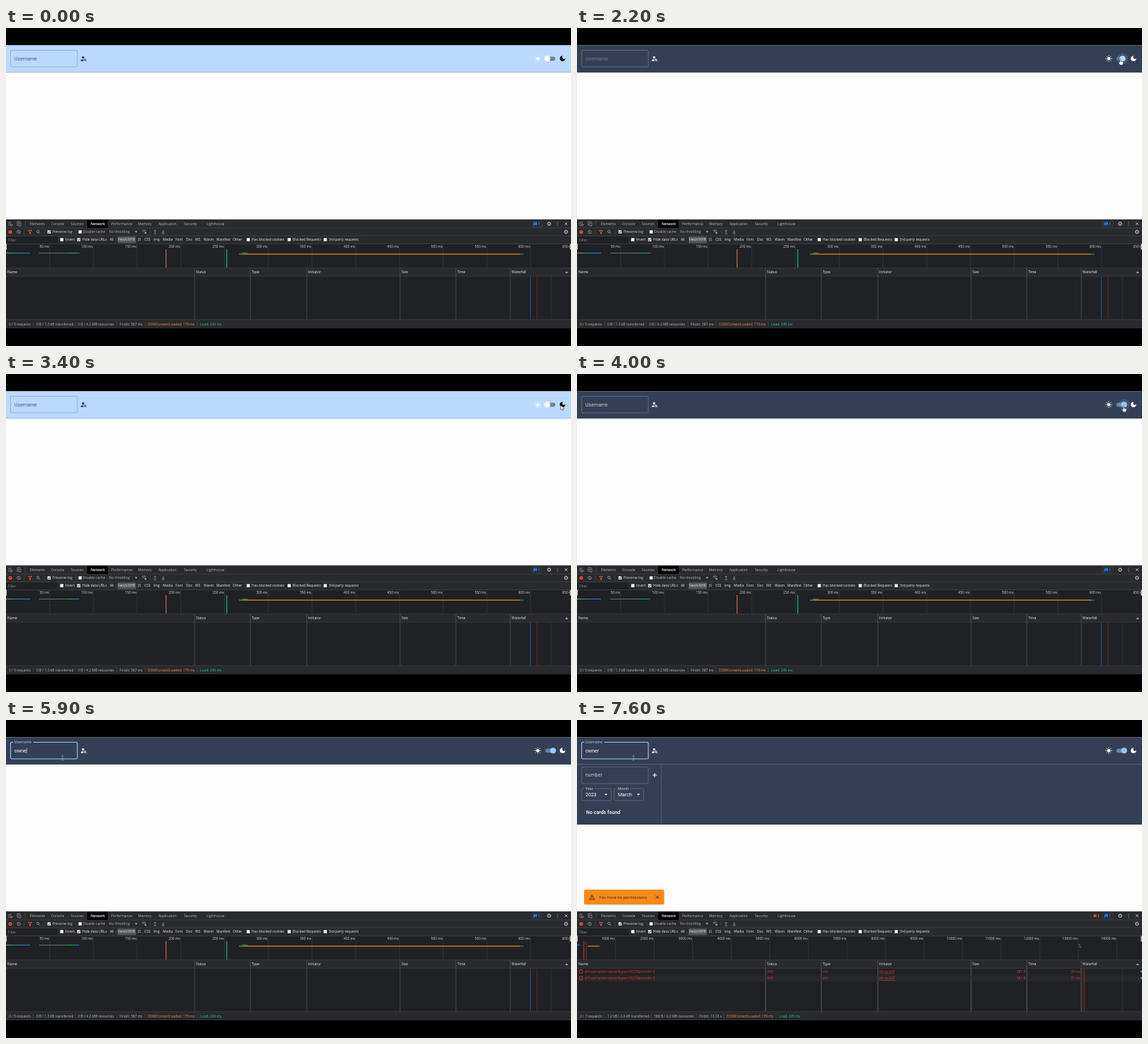
Animation, 800 px wide and 450 px high, one loop 8000 ms. Source, as an HTML page:

```html
<!DOCTYPE html>
<html>
<head>
<meta charset="utf-8">
<style>
html, body { margin: 0; height: 100%; overflow: hidden; background: #000; }
svg { display: block; width: 100vw; height: 100vh; }
text { font-family: "Open Sans", "Noto Sans", sans-serif; white-space: pre; }
.ui { font-family: Roboto, Arial, sans-serif; letter-spacing: .01em; }
</style>
</head>
<body>
<svg id="stage" viewBox="0 0 800 450">
  <g id="page"></g>
  <g id="tools"></g>
  <g id="idle"></g>
  <g id="failed"></g>
  <g id="pointer"></g>
</svg>
<script>
const $ = id => document.getElementById(id);
const rect = (x, y, w, h, fill, more = '') =>
  `<rect x="${x}" y="${y}" width="${w}" height="${h}" fill="${fill}" ${more}/>`;
const path = (d, stroke, width = .7, more = '') =>
  `<path d="${d}" fill="none" stroke="${stroke}" stroke-width="${width}" ${more}/>`;
const shape = (d, fill, more = '') => `<path d="${d}" fill="${fill}" ${more}/>`;
const dot = (x, y, r, fill, more = '') => `<circle cx="${x}" cy="${y}" r="${r}" fill="${fill}" ${more}/>`;
// y is the middle of the capitals
const text = (s, x, y, fill = '#d5d6d8', size = 4.9, more = '') =>
  `<text x="${x}" y="${y + size * .36}" fill="${fill}" font-size="${size}" ${more}>${s}</text>`;
const ui = (s, x, y, fill, size = 6.9, more = '') => text(s, x, y, fill, size, 'class="ui" ' + more);
const right = 'text-anchor="end"';
const bold = 'font-weight="600"';

/* ---------- developer tools ---------- */
const GREY = '#9aa0a6', LINE = '#46494d', ORANGE = '#ec8a4c', TEAL = '#20bfa5', RED = '#d93a3a';
const vline = (x, y1, y2, c = LINE, w = .7) => path(`M${x} ${y1}V${y2}`, c, w);
const bar = (x1, x2, y, c, w = 1.2) => path(`M${x1} ${y}H${x2}`, c, w);
const gear = (x, y) => path(`M${x - 2} ${y}a2 2 0 1 0 4 0a2 2 0 1 0 -4 0`, GREY, 1.3) +
  path(`M${x - 2.9} ${y}h5.8M${x} ${y - 2.9}v5.8`, GREY, .7) + dot(x, y, 1, '#292a2d');
const check = (x, y, on) => rect(x - 2.3, y - 2.3, 4.6, 4.6, '#f4f4f4', 'rx=".6"') +
  (on ? path(`M${x - 1.4} ${y}l1.1 1.2 1.8-2.4`, '#222', .9) : '');
const row = (items, y, fill) => items.map(([s, x]) => text(s, x, y, fill)).join('');
const columns = [['Name', 2], ['Status', 269], ['Type', 348], ['Initiator', 428], ['Size', 560], ['Time', 639], ['Waterfall', 716]];

function tools() {
  let s = rect(0, 271, 800, 154, '#202124') + rect(0, 271, 800, 34.5, '#292a2d') +
    rect(0, 340, 800, 11, '#292a2d') + rect(0, 413, 800, 12, '#292a2d');
  for (const y of [271, 283, 294, 305.5, 339.7, 351.2, 412.7]) s += bar(0, 800, y, LINE, .6);
  // tabs
  s += path('M8 275H4v4.500h1.500M6 277l3.500 1.400-1.500.7-.7 1.500z', GREY) +
    path('M16 280v-6h4.500M18 276h3v4h-3z', GREY) + vline(27, 273, 281);
  s += row([['Elements', 34], ['Console', 64], ['Sources', 92], ['Performance', 149], ['Memory', 187],
    ['Application', 216], ['Security', 252], ['Lighthouse', 284]], 277, '#b4b8bc');
  s += rect(115, 271.5, 29, 11.500, '#000') + text('Network', 120, 277, '#fff', 4.8, bold);
  s += rect(744, 273, 15, 8, 'none', `stroke="${LINE}" stroke-width=".6" rx="1"`) +
    shape('M746.500 274.800h5.500v4h-3.500l-2 1.500z', '#1a73e8') + text('1', 753.5, 277, '#9ec3fa', 4.6);
  s += gear(769, 277) + [274.8, 277, 279.2].map(y => dot(781, y, .6, GREY)).join('') +
    path('M791 275l4 4m0-4l-4 4', '#c4c7ca', .8);
  // toolbar
  s += dot(6, 288.5, 2.6, '#e5533d') + dot(6, 288.5, 1, '#8f2a20') +
    path('M15.700 288.500a2.300 2.300 0 1 0 4.600 0a2.300 2.300 0 1 0-4.600 0M16.500 286.800l3.200 3.400', GREY) +
    vline(25.500, 285, 292) + path('M31.500 286.500h5l-2 2.200v2.500h-1v-2.500z', '#e5533d', .9) +
    path('M43.500 288a1.700 1.700 0 1 0 3.400 0a1.700 1.700 0 1 0-3.400 0M46.500 289.300l2 2', GREY, .8) + vline(54, 285, 292);
  s += check(61, 288.5, 1) + text('Preserve log', 66, 288.5) + vline(99, 285, 292) + check(105, 288.5) +
    row([['Disable cache', 109], ['No throttling', 146]], 288.5, '#b4b8bc') + shape('M182.300 287.200h3.800l-1.900 2.800z', GREY);
  s += path('M192.500 287q3-2.500 6 0M193.800 288.500q1.700-1.500 3.400 0', GREY, .8) + dot(197.500, 290, 1.3, GREY) + vline(204, 285, 292) +
    path('M211 290v-4m-1.600 1.600l1.600-1.600 1.600 1.600M209 291h4', GREY) +
    path('M222.500 286v4m-1.600-1.600l1.600 1.600 1.600-1.600M220.500 291h4', GREY) + gear(793, 288.5);
  // filters
  s += rect(0, 295, 73, 10, '#202124') + text('Filter', 3, 300, '#8b8f94') + rect(158, 295.300, 26, 9, '#55585c', 'rx="1"') + vline(156, 297, 303);
  s += row([['Invert', 84], ['Hide data URLs', 108], ['All', 147], ['Fetch/XHR', 159], ['JS', 187], ['CSS', 196], ['Img', 209],
    ['Media', 222], ['Font', 240], ['Doc', 255], ['WS', 268], ['Wasm', 280], ['Manifest', 298], ['Other', 321],
    ['Has blocked cookies', 348], ['Blocked Requests', 406], ['3rd-party requests', 457]], 299.5, '#e8eaed');
  s += [79, 103, 343, 401, 452].map(x => check(x, 299.5, x == 103)).join('');
  // table
  s += row(columns, 345.7, '#e8eaed') + shape('M791.800 347h4l-2-3z', GREY);
  for (const [, x] of columns.slice(1)) s += vline(x - 2, 340, 412.5, '#54575b');
  return s + rect(0, 305.500, 1, 8, '#ccc') + rect(798.500, 305.500, 1.500, 8, '#ccc');
}

function ruler(step, unit) {
  let s = '';
  for (let i = 1; i * step < 810; i++)
    s += vline(i * step, 306, 339, '#393b3f') + text(i * unit + ' ms', i * step - 1, 309.3, '#d5d6d8', 4.8, right);
  return s;
}
function footer(items) {
  const colors = { 4: ORANGE, 5: TEAL };
  return items.map(([s, x], i) =>
    (i ? vline(x - 4, 416, 422) : '') + text(s, x, 419, colors[i] || '#b4b8bc')).join('');
}

function idle() {
  return ruler(61.9, 50) +
    bar(0, 9, 318.5, '#66806f') + bar(9, 17, 318.5, '#1c9c55') + bar(17, 34, 318.5, '#1c78c8') +
    bar(47, 88, 318.5, '#6b6d70') + bar(88, 98, 318.5, '#1c9c55') + bar(98, 104, 318.5, '#1c78c8') +
    bar(334, 342, 318.5, '#1c8c5a') + bar(330, 335, 320, '#888') + bar(335, 728, 320, '#bd7c14', 1.4) +
    bar(728, 733, 320, '#1a8888') +
    vline(226.7, 313, 339, '#df7550', 1) + vline(312.7, 313, 339, TEAL, 1) +
    vline(742.5, 352, 412, '#22508f', 1) + vline(752, 352, 412, '#702222', 1) + vline(772, 352, 412, '#393b3f') +
    footer([['0 / 5 requests', 4], ['0 B / 1.3 kB transferred', 43], ['0 B / 4.2 MB resources', 102],
      ['Finish: 587 ms', 161], ['DOMContentLoaded: 179 ms', 201], ['Load: 249 ms', 275]]);
}

function failed() {
  let s = ruler(54.6, 1000) + bar(0, 4, 318.5, '#1c78c8') + bar(15, 32, 320, '#bd7c14', 1.4) +
    vline(9.7, 313, 339, '#b8503f', .9) + vline(13.200, 313, 339, '#7d3434', .9) +
    bar(710, 712, 318, '#3c8c77') + bar(711, 714, 321, '#777') +
    rect(0, 361, 800, 9.300, '#27282b') +
    vline(715.8, 352, 412, '#5b2929') + vline(718.200, 352, 412, '#9c2b2b', .9) + vline(772, 352, 412, '#393b3f');
  for (const [, x] of columns.slice(1)) s += vline(x - 2, 351, 412.5, '#54575b');
  [356, 365.2].forEach((y, i) => {
    s += rect(3.5, y - 2.200, 4.200, 4.400, 'none', `stroke="${RED}" stroke-width=".8"`) +
      text('all?username=owner&amp;year=2023&amp;month=3', 10.5, y, RED) + text('403', 269, y, RED) + text('xhr', 348, y, RED) +
      text('xhr.js:247', 428, y, RED, 4.9, 'text-decoration="underline"') +
      text('581 B', 635.5, y, RED, 4.9, right) + text(['33 ms', '51 ms'][i], 713, y, RED, 4.9, right) +
      bar(798, 800, y, TEAL, 2);
  });
  return s + rect(731.5, 275, 4, 4, '#e5453a', 'rx=".8"') + text('2', 737, 277, '#f28b82', 4.6) +
    footer([['2 / 7 requests', 4], ['1.2 kB / 2.4 kB transferred', 43], ['188 B / 4.2 MB resources', 109],
      ['Finish: 13.10 s', 173], ['DOMContentLoaded: 179 ms', 212], ['Load: 249 ms', 286]]);
}

/* ---------- page ---------- */
const DARK = '#343f55', BLUE = '#90caf9', EDGE = '#5f6a7e';
const FLIPS = [2150, 2900, 3800], FOCUS = 4900, PANEL = 6300, REPLY = 6450;
const NAME = 'owner', KEYS = [5300, 5400, 5600, 5800, 6000];
const MOVES = [[600, 297, 230], [1400, 740, 58], [2100, 769, 43.5], [2900, 770, 44], [3400, 785.5, 44],
  [3800, 772, 43], [4150, 775, 46], [4700, 80, 53]];

const clamp = v => Math.max(0, Math.min(1, v));
const out = v => 1 - (1 - clamp(v)) ** 3;
const lerp = (a, b, p) => a + (b - a) * p;
const mix = (a, b, p) => `rgba(${a.map((v, i) => lerp(v, b[i], p))})`;
const pen = document.createElement('canvas').getContext('2d');
pen.font = '69px Roboto, Arial, sans-serif';
const width = s => pen.measureText(s).width / 10 + s.length * .069;

function mouse(t) {
  const i = MOVES.findIndex(m => m[0] > t);
  if (i < 0) return MOVES[MOVES.length - 1].slice(1);
  if (!i) return null;
  const [t0, x0, y0] = MOVES[i - 1], [t1, x1, y1] = MOVES[i];
  let p = (t - t0) / (t1 - t0);
  p = p * p * (3 - 2 * p);
  return [lerp(x0, x1, p), lerp(y0, y1, p)];
}
const box = (x, y, w, h, c, sw = .8) => rect(x, y, w, h, 'none', `stroke="${c}" stroke-width="${sw}" rx="1.600"`);
const select = (x, label, value, gap) => box(x, 97, 42, 17, EDGE) + rect(x + 4, 96, gap, 2, DARK) +
  ui(label, x + 5.500, 97, '#c6cad1', 5.200) + ui(value, x + 5.500, 105.500, '#fff') +
  shape(`M${x + 32.300} 104.600h4.400l-2.200 2.200z`, '#fff');

function panel() {
  return rect(0, 63, 800, 85, DARK) + bar(0, 800, 62.7, EDGE, .6) + vline(119.4, 63, 148, EDGE, .6) +
    box(6.500, 66.500, 94.500, 23.500, EDGE) + ui('number', 12, 78, '#bfc4cc') +
    path('M107 78h6m-3-3v6', '#fff', 1) + select(6.5, 'Year', '2023', 14) + select(52.5, 'Month', 'March', 18) +
    ui('No cards found', 13, 130.7, '#fff', 6.9, 'font-weight="500"');
}

function snackbar(p) {
  return `<g opacity="${p}" transform="translate(66.700 250.500) scale(${lerp(.8, 1, p)}) translate(-66.700 -250.500)">` +
    rect(10, 241, 113.500, 21, '#0002', 'rx="2"') + rect(10, 240, 113.500, 21, '#f58a1a', 'rx="2"') +
    path('M17.500 254l3.700-6.500 3.700 6.500zM21.200 249.500v2.200m0 .7v.8', '#2f2210', .8) +
    ui('You have no permissions', 31, 250.6, '#50320f', 6) + path('M111.500 248.500l4.400 4.400m0-4.400l-4.400 4.400', '#2f2210', .9) + '</g>';
}

function page(t, m) {
  const flips = FLIPS.filter(f => f <= t), dark = flips.length % 2;
  const age = flips.length ? t - flips[flips.length - 1] : 1e4;
  const tone = d => dark ? out(age / d) : 1 - out(age / d);
  const over = m && m[0] < 101 && m[1] < 56, focus = t >= FOCUS;
  const ink = dark ? '#fff' : '#27303b';
  let s = rect(0, 24.500, 800, 247, '#fdfdfe') + rect(0, 24.500, 800, 38.500, dark ? DARK : '#bbd9fd') +
    bar(0, 800, 62.7, dark ? '#4a5569' : '#8fa8c6', .6);
  // search field
  const shrink = out((t - FOCUS) / 200);
  s += box(6.500, 31.500, 94.500, 23.500, focus ? BLUE : over ? '#fff' : dark ? '#63748a' : '#8faacb', focus ? 1.100 : .8);
  if (focus) s += rect(10.500, 30.500, 28 * shrink, 2.200, DARK);
  s += ui('Username', 12, lerp(43.2, 31.300, shrink), focus ? BLUE : mix([0, 0, 0, .58], [255, 255, 255, .75], tone(200)), lerp(6.9, 5.200, shrink));
  const typed = NAME.slice(0, KEYS.filter(k => k <= t).length);
  s += ui(typed, 12, 43.5, '#fff');
  const last = KEYS.filter(k => k <= t).pop() || FOCUS;
  if (focus && Math.floor((t - last) / 500) % 2 == 0) s += rect(12 + width(typed), 39.500, .6, 8, '#fff');
  const icon = x => `transform="translate(${x} 38.300) scale(.417)"`;
  s += shape('M10 4a4 4 0 1 0 .01 0zM10.350 14C7.600 13.900 2 15.300 2 18v2h9.500c-2.500-2.800-1.200-5.900-1.150-6z', ink, icon(105)) +
    path('M13 16a3 3 0 1 0 6 0a3 3 0 1 0-6 0M18.200 18.200l3.100 3.100', ink, 2, icon(105));
  // theme switch
  s += dot(753, 43.300, 2.400, '#fff');
  for (let a = 0; a < 360; a += 45) s += path('M753 40.100v-1.600', '#fff', .8, `transform="rotate(${a} 753 43.300)"`);
  const p = tone(150), x = lerp(766.5, 774.7, p);
  s += rect(763.500, 40.400, 14.200, 5.800, mix([0, 0, 0, .4], [144, 202, 249, .5], p), 'rx="2.900"');
  if (m && Math.abs(m[0] - 771) < 9 && Math.abs(m[1] - 44) < 6) s += dot(x, 43.3, 7.900, dark ? '#90caf929' : '#0000000a');
  s += dot(x, 43.3, 4.100, mix([255, 255, 255, 1], [144, 202, 249, 1], p));
  s += shape('M12 3a9 9 0 1 0 9 9q0-.7-.1-1.360a5.400 5.400 0 1 1-7.540-7.540Q12.700 3 12 3z', dark ? '#fff' : '#000', icon(783));
  if (t >= PANEL) s += panel();
  if (t >= REPLY) s += snackbar(out((t - REPLY) / 220));
  return s;
}

function pointer(m) {
  if (!m) return '';
  const [x, y] = m, at = `transform="translate(${x} ${y})" stroke="#222" stroke-width=".5"`;
  if (x < 101 && y < 56) return path('M-1.300-3h2.600M0-3v6.500M-1.300 3.500h2.600', '#9aa1ad', .7, `transform="translate(${x} ${y + .5})"`);
  if (Math.abs(x - 771) < 9 && Math.abs(y - 44) < 6)
    return shape('M-.6 .6q.7-1 1.400 0v3l3 .8q.8.300.6 1.200l-.7 3.200h-3.800l-2.400-3.500q.4-1 1.900.2z', '#fff', at);
  return shape('M0 0v6.800l1.600-1.500 1.100 2.400 1-.4-1.100-2.400h2.200z', '#fff', at);
}

$('tools').innerHTML = tools();
$('idle').innerHTML = idle();
$('failed').innerHTML = failed();

function draw(now) {
  const t = now % 8000, m = mouse(t), done = t >= REPLY;
  $('page').innerHTML = page(t, m);
  $('pointer').innerHTML = pointer(m);
  $('idle').style.display = done ? 'none' : '';
  $('failed').style.display = done ? '' : 'none';
  requestAnimationFrame(() => draw(performance.now() - start));
}
const start = performance.now();
draw(0);
</script>
</body>
</html>
```
